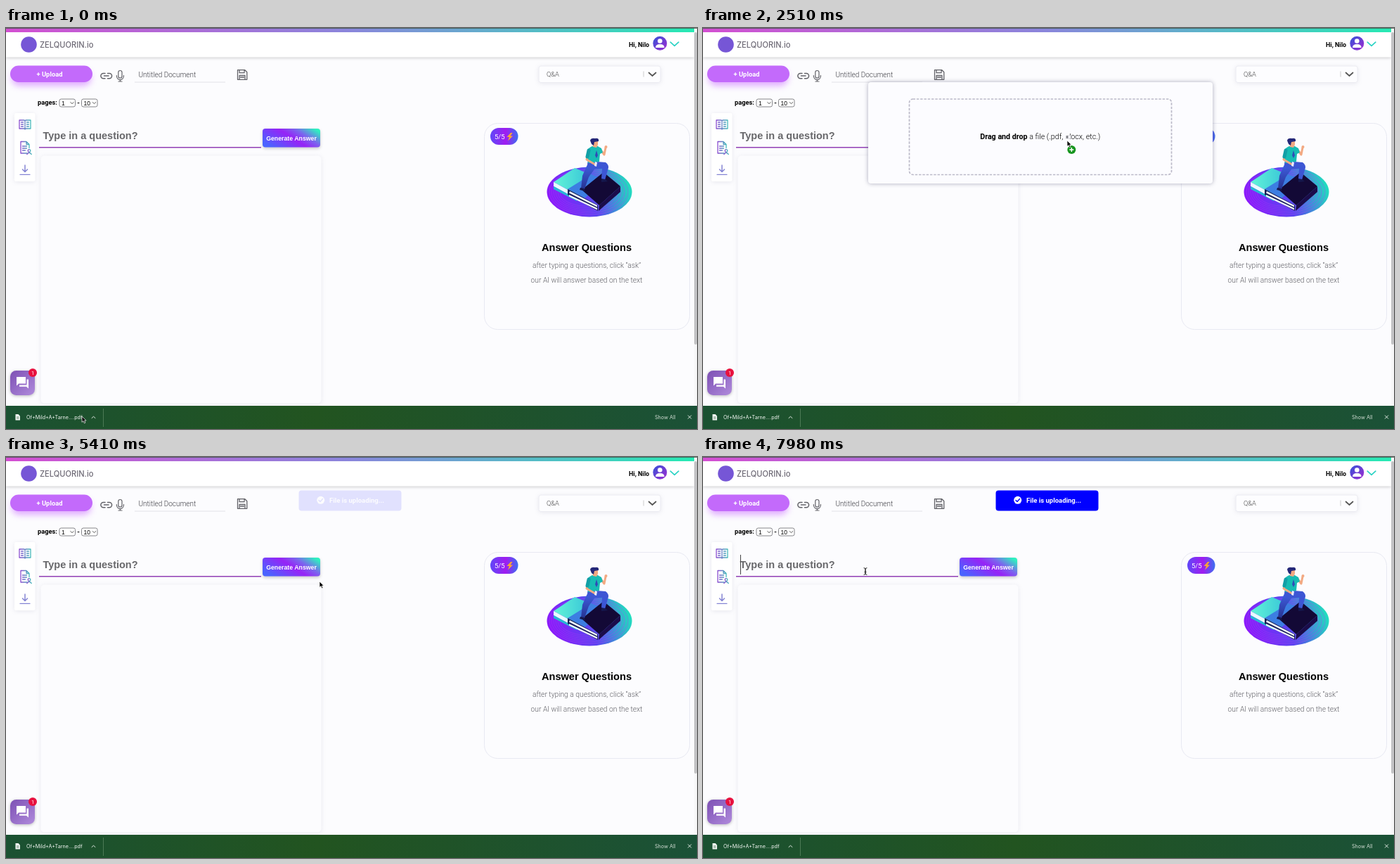
These frames come from a looping animation (983 px wide and 570 px high, 8000 ms). An HTML page:

```html
<!DOCTYPE html>
<html lang="en">
<head>
<meta charset="utf-8">
<title>Document upload</title>
<style>
  html, body { margin: 0; width: 100%; height: 100%; overflow: hidden; background: #fcfcfe; }
  svg { display: block; width: 100vw; height: 100vh; font-family: Roboto, sans-serif; }
  .arial { font-family: "Liberation Sans", Arial, sans-serif; }
  .inter { font-family: Inter, sans-serif; }
  .bold { font-weight: 700; }
  .light { font-weight: 300; }
  .mid { text-anchor: middle; }
  .line { fill: none; stroke-linecap: round; stroke-linejoin: round; }
  .soft { filter: drop-shadow(0 1px 3px #5050781f); }
</style>
</head>
<body>
<svg viewBox="0 0 983 570">
  <defs>
    <linearGradient id="topBar"><stop stop-color="#d44fd2"/><stop offset=".5" stop-color="#8a86dc"/><stop offset="1" stop-color="#27eab4"/></linearGradient>
    <linearGradient id="dock"><stop stop-color="#1b5132"/><stop offset=".45" stop-color="#225420"/><stop offset="1" stop-color="#1b5137"/></linearGradient>
    <linearGradient id="generate" y1=".7" x2="1" y2=".2"><stop stop-color="#4a63ff"/><stop offset=".5" stop-color="#9624f6"/><stop offset=".72" stop-color="#7b65ee"/><stop offset="1" stop-color="#2ff0c0"/></linearGradient>
    <linearGradient id="credits"><stop stop-color="#5f48f8"/><stop offset=".55" stop-color="#a01cf0"/><stop offset="1" stop-color="#3d6ff0"/></linearGradient>
    <linearGradient id="chat" x1="0" y1="0" x2="1" y2="1"><stop stop-color="#7d50b4"/><stop offset="1" stop-color="#b08bdc"/></linearGradient>
    <linearGradient id="avatar" x1="0" x2="1" y2="1"><stop stop-color="#3553d8"/><stop offset="1" stop-color="#a12bd0"/></linearGradient>
    <linearGradient id="icon"><stop stop-color="#8a4bd0"/><stop offset="1" stop-color="#43b9b9"/></linearGradient>
    <linearGradient id="disc" y1=".6" x2="1" y2=".4"><stop stop-color="#8d18fb"/><stop offset=".5" stop-color="#5a45f0"/><stop offset="1" stop-color="#1fe3bd"/></linearGradient>
    <linearGradient id="cover"><stop stop-color="#62f4d8"/><stop offset="1" stop-color="#2cb8d8"/></linearGradient>
    <linearGradient id="trousers" x1="0" y1="0" x2="0" y2="1"><stop stop-color="#4161e6"/><stop offset="1" stop-color="#263391"/></linearGradient>
    <filter id="blur" x="-30%" y="-80%" width="160%" height="260%"><feGaussianBlur stdDeviation="5"/></filter>
    <path id="chevron" class="line" d="M-5-2 0 2.5 5-2"/>
  </defs>

  <rect width="983" height="570" fill="#fcfcfe"/>

  <!-- header -->
  <rect width="979" height="41.5" fill="#fff" style="filter:drop-shadow(0 1px 2px #0003)"/>
  <rect width="979" height="6" fill="url(#topBar)"/>
  <rect width="983" height="1" fill="#3d5546" opacity=".75"/>
  <rect x="979" y="1" width="4" height="536" fill="#f7f7f8"/>
  <rect x="979" y="6" width="4" height="444" rx="2" fill="#c3c3c5"/>
  <circle cx="32.5" cy="23.5" r="11.3" fill="#7656d6"/>
  <text class="inter" x="48" y="28" font-size="11.1" font-weight="500" fill="#6d6975">ZELQUORIN.io</text>
  <text class="bold" x="886" y="26.5" font-size="8.9">Hi, Nilo</text>
  <circle cx="930.3" cy="21.8" r="10" fill="url(#avatar)"/>
  <g fill="#fff"><circle cx="930.3" cy="18.5" r="3.3"/><path d="M924 28q0-5 6.3-5t6.3 5z"/></g>
  <use href="#chevron" transform="translate(951 22.5) scale(1.15)" stroke="#2bd3c4" stroke-width="1.5"/>

  <!-- toolbar -->
  <rect x="8" y="60" width="113" height="22" rx="11" fill="#d58cff" opacity=".75" filter="url(#blur)"/>
  <rect x="6" y="53.5" width="117" height="23.5" rx="11.7" fill="#c36afb"/>
  <text class="bold" x="43.5" y="69" font-size="9.4" fill="#fff">+ Upload</text>
  <g class="line" stroke="#626268" stroke-width="1.5">
    <path d="M141 64.5h-2.5a3.6 3.6 0 0 0 0 7.2H141M144.500 64.500h2.500a3.600 3.600 0 0 1 0 7.200h-2.500M139.500 68.100h6.500"/>
    <rect x="159.800" y="60.500" width="5.200" height="10.500" rx="2.600" stroke-width="1.200"/>
    <path stroke-width="1.200" d="M157.300 67.500c0 8 10.200 8 10.200 0M162.400 73.500v2.500M160 76h5"/>
    <path stroke-width="1.300" d="M329.500 59.700h10.300l3 3v10.600h-13.300zM332 59.700v4h7v-4M332 73v-5.500h8v5.500M333.500 70h5"/>
  </g>
  <text class="light" x="188.500" y="69.500" font-size="10" fill="#3f3f45">Untitled Document</text>
  <path d="M183 77h129" stroke="#e1e1e7"/>
  <g class="soft"><rect x="758" y="54" width="173" height="23.500" rx="3" fill="#fdfdff" stroke="#ececf2"/></g>
  <text class="light" x="769" y="68.500" font-size="9.300" fill="#444">Q&amp;A</text>
  <path d="M907 61.500v8" stroke="#ccc"/>
  <use href="#chevron" x="919.500" y="65.500" stroke="#555" stroke-width="1.700"/>
  <text class="bold" x="45" y="109" font-size="9.300">pages:</text>
  <text class="bold" x="101.300" y="109" font-size="9.300">-</text>
  <g fill="#fff" stroke="#77777c" stroke-width=".9">
    <rect x="76" y="101" width="22.500" height="11" rx="2.500"/><rect x="107.500" y="101" width="22.500" height="11" rx="2.500"/>
  </g>
  <g class="arial" font-size="8.500"><text x="79" y="109.500">1</text><text x="110.500" y="109.500">10</text></g>
  <g stroke="#333" stroke-width="1.800">
    <use href="#chevron" transform="translate(94 106.500) scale(.45)"/><use href="#chevron" transform="translate(125.500 106.500) scale(.45)"/>
  </g>

  <!-- side menu -->
  <rect class="soft" x="12" y="121" width="29.500" height="97" rx="2" fill="#fff"/>
  <g class="line" stroke="url(#icon)" stroke-width="1.300">
    <path d="M19 131h7l1 1 1-1h7v12h-7l-1 1-1-1h-7zM27 132v12M21.500 134h3M21.500 137h3M21.500 140h3M29.500 134h3M29.500 137h3M29.500 140h3"/>
    <path d="M30 178h-9v-16.500h8l4 4v5M29 161.500v4h4M23.500 168h6M23.500 171h6M23.500 174h4"/>
    <circle cx="33" cy="174.500" r="1.800"/><path d="M29.800 179.500q3.200-4.500 6.400 0"/>
  </g>
  <g class="line" stroke="#8585d4" stroke-width="1.500"><path d="M27 195v9M23.500 201l3.500 3.500 3.500-3.500"/><path d="M20 208.300h14" stroke-width="1.300"/></g>

  <!-- question and answer area -->
  <rect class="soft" x="49.500" y="181.500" width="399" height="352" rx="5" fill="#fcfcfe"/>
  <text class="arial bold" x="52.500" y="158" font-size="14.500" fill="#68686b">Type in a question?</text>
  <path d="M47 169.800h316" stroke="#9140b5" stroke-width="1.500"/>
  <rect x="365" y="143" width="82" height="26.500" rx="4" fill="url(#generate)" style="filter:drop-shadow(0 2px 2px #0003)"/>
  <text class="arial bold mid" x="406" y="160" font-size="8.750" fill="#fff">Generate Answer</text>
  <path id="dropCaret" d="M73.500 207v9" stroke="#63b7b5"/>
  <path id="inputCaret" d="M53.500 139v28" stroke="#444"/>

  <!-- info card -->
  <rect x="680.500" y="135.500" width="292" height="293" rx="19" fill="#fcfcfe" stroke="#e8e9f2"/>
  <rect x="689" y="142" width="39.500" height="24" rx="12" fill="url(#credits)"/>
  <text x="695" y="157.500" font-size="9.500" fill="#fff">5/5</text>
  <path d="M718 149l-5.500 6h3.500l-2 5.500 7-7h-3.500l3-4.500z" fill="#ffa632"/>
  <ellipse cx="830" cy="233" rx="60.500" ry="35.500" fill="url(#disc)"/>
  <g id="rings" fill="none" stroke="#b33df5" stroke-width=".7" opacity=".55"></g>
  <path d="M779 219l30-20 34 14-31 24z" fill="url(#cover)"/>
  <path d="M779 219l33 18v6l-33-18z" fill="#eafaff"/>
  <path d="M779 225l33 18v3l-33-17z" fill="#27b7d6"/>
  <path d="M799 229l34-21 20 9-30 25z" fill="#3c7ee2"/>
  <path d="M799 229l43 23v8l-43-23z" fill="#192058"/>
  <path d="M802 232l39 20v2.500l-40-20zM801 237l40 19v2.500l-40-19z" fill="#f1f5ff"/>
  <path d="M819 230l31-25 24 20-30 27z" fill="#130936"/>
  <path d="M844 252l30-27v8l-31 27z" fill="#1b0c4a"/>
  <path d="M828 192l-8 18-2 18 5 1 6-17 10-14z" fill="url(#trousers)"/>
  <path d="M828 189l25 2q6 4 3 11l-4 14-5-1 1-15-17 1q-6-5-3-12z" fill="#3d56d4"/>
  <path d="M817 227l5 1 2 4-8-2zM847 214l5 1 4 3-9 1z" fill="#15184e"/>
  <path class="line" d="M845 172l6 8 2-10" stroke="#f2a982" stroke-width="3"/>
  <circle cx="853.500" cy="169" r="2" fill="#f2a982"/>
  <path d="M827 173q5-6 13-6l7 4 2 6-4 2-1 11-16 2-1-9z" fill="#18bcb4"/>
  <path class="line" d="M829 176l-3 11 12 7" stroke="#f2a982" stroke-width="3"/>
  <path class="line" d="M829 174l-2 9" stroke="#139fa6" stroke-width="5"/>
  <path d="M838 190l3 1-1 6-3-1z" fill="#e9ecff"/>
  <path d="M840 174l2 7-2 4-2-4z" fill="#314bb8"/>
  <path d="M834 161h8v5l-2 4-5-1z" fill="#f2a982"/>
  <path d="M831 160q1-4 7-3 6-1 5 4l-6 1-1 5-3-2z" fill="#252878"/>
  <text class="arial bold mid" x="826" y="316.500" font-size="14.600">Answer Questions</text>
  <g class="light mid" font-size="10.250" fill="#606066">
    <text x="826" y="341">after typing a questions, click “ask”</text>
    <text x="826" y="362">our AI will answer based on the text</text>
  </g>

  <!-- chat button -->
  <rect x="6" y="487" width="35" height="35" rx="8.500" fill="url(#chat)" style="filter:drop-shadow(0 1px 2px #0004)"/>
  <path d="M15 496h13v9.500H18l-3 3z" fill="#fff"/>
  <path d="M29.500 499.500h2.500v13l-3-2.700H19v-2.300h10.500z" fill="#fff"/>
  <circle cx="38" cy="490" r="6" fill="#e8123f"/>
  <text class="mid" x="38" y="492.700" font-size="7.500" fill="#fff">1</text>

  <!-- downloads bar -->
  <rect y="537" width="983" height="33" fill="url(#dock)"/>
  <path d="M138.500 541v26" stroke="#4c7955"/>
  <path d="M13.500 549h4l2.500 2.500v6h-6.500z" fill="#f3f6f4"/>
  <path d="M15 553h3.500M15 555h3.500" stroke="#477052" stroke-width=".8"/>
  <g class="inter" fill="#f2f6f2"><text x="29" y="556.300" font-size="7.200">Of+Mild+A+Tarne....pdf</text><text x="923" y="555.800" font-size="7.200" fill="#d2ded4">Show All</text></g>
  <use href="#chevron" transform="translate(124.500 553.500) scale(.5 -.5)" stroke="#e0e8e1" stroke-width="2"/>
  <path d="M970 550.500l5 5m0-5l-5 5" stroke="#dce6de"/>

  <!-- drop zone -->
  <g id="dropZone">
    <rect x="235" y="77" width="490" height="144" rx="4" fill="#fcfcff" style="filter:drop-shadow(0 0 3px #50507077)"/>
    <rect x="293.500" y="101" width="373" height="107.500" rx="5" fill="none" stroke="#bcbac9" stroke-width="1.700" stroke-dasharray="3.500 1.800"/>
    <text class="mid light" x="479.700" y="158" font-size="10.700"><tspan class="bold">Drag and drop</tspan> a file (.pdf, .docx, etc.)</text>
  </g>

  <g id="toast">
    <rect x="416.500" y="47.500" width="146" height="29" rx="4" fill="#00f"/>
    <circle cx="447.700" cy="61.300" r="5.500" fill="#fff"/>
    <path class="line" d="M445 61.500l2 2 3.500-4" stroke="#00f" stroke-width="1.400"/>
    <text class="bold" x="460" y="65.300" font-size="9.500" fill="#fff">File is uploading...</text>
  </g>

  <!-- pointer, origin at its hot spot -->
  <g id="pointer">
    <g id="dragged"><circle r="5" fill="#fafaff" opacity=".85"/><path d="M-1.500-2h3v4h-3z" fill="#85858b"/></g>
    <g id="badge"><circle cx="6.300" cy="13" r="6" fill="#17951f"/><path d="M3.300 13h6M6.300 10v6" stroke="#fff" stroke-width="1.500"/></g>
    <path id="arrow" d="M0 0v8.300l2-1.700 1.400 3.200 1.500-.7-1.400-3.100h2.600z" fill="#000" stroke="#fff" stroke-width=".7"/>
    <path id="beam" class="line" d="M-2-4.800q2 0 2 1.500v6.600q0 1.500-2 1.500M2-4.800q-2 0-2 1.500v6.600q0 1.500 2 1.500M-1 1h2" stroke="#222"/>
  </g>
</svg>
<script>
const LOOP = 8000, DRAG_IN = 480, DROP = 2850;
const FADE_START = 5220, FADE_TIME = 1890;

// time, x, y
const path = [
  [0, 108, 552], [150, 108, 552], [920, 198, 446], [1000, 198, 446], [2400, 518, 160],
  [3500, 519, 161], [4500, 519, 161], [5410, 446, 177], [6580, 289, 188], [7650, 231, 162.500], [LOOP, 231, 162.500]
];

const $ = id => document.getElementById(id);
const clamp = v => Math.max(0, Math.min(1, v));
const show = (id, visible) => $(id).setAttribute("opacity", +visible);

function pointerAt(t) {
  const next = path.findIndex(point => point[0] > t);
  const [t0, x0, y0] = path[next - 1], [t1, x1, y1] = path[next];
  const u = (t - t0) / (t1 - t0), ease = u * u * (3 - 2 * u);
  return [x0 + (x1 - x0) * ease, y0 + (y1 - y0) * ease];
}

function draw(t) {
  const [x, y] = pointerAt(t);
  const dragging = t >= DRAG_IN && t < DROP;
  const beam = t >= DROP && (x < 444 || x > 512);
  show("dropZone", dragging);
  show("badge", dragging);
  show("dragged", dragging);
  show("beam", beam);
  show("arrow", !beam);
  show("dropCaret", dragging && y < 530 && y > 221 && x < 449);
  show("inputCaret", t >= 7700);
  show("toast", clamp((t - FADE_START) / FADE_TIME));
  $("pointer").setAttribute("transform", `translate(${x} ${y})`);
  const gap = 1 - clamp((t - 1000) / 1400);
  $("dragged").setAttribute("transform", `translate(${-15 * gap} ${18 * gap - 5})`);
}

for (let i = 1; i < 7; i++) {
  $("rings").innerHTML += `<ellipse cx="${830 - i}" cy="233" rx="${60 - i * 4}" ry="${35 - i * 2.5}"/>`;
}

const start = performance.now();
function tick() {
  draw((performance.now() - start) % LOOP);
  requestAnimationFrame(tick);
}
tick();
</script>
</body>
</html>
```
